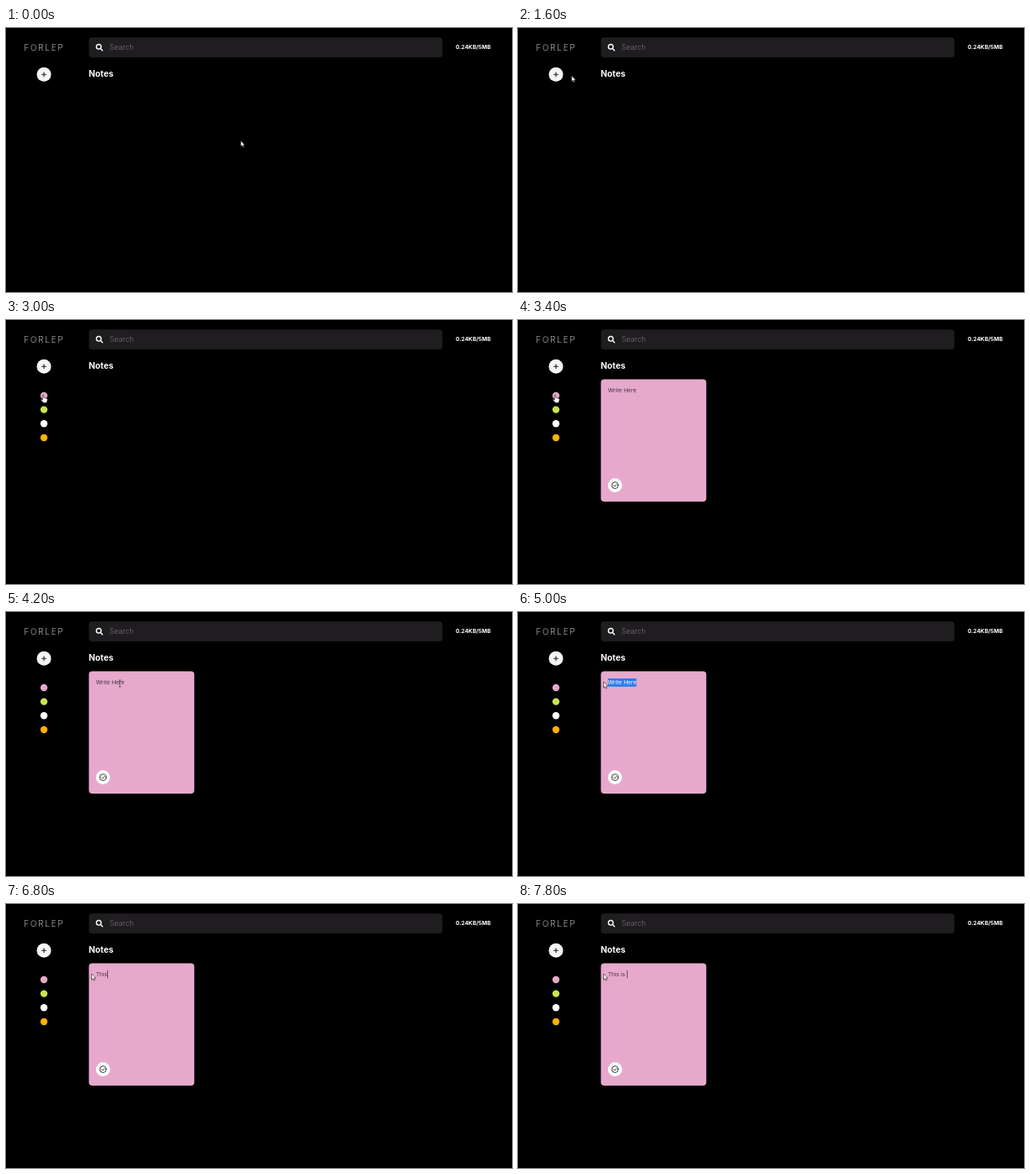
Animation of 600x314 px, one loop 8 s. Source, as an HTML page:

```html
<!DOCTYPE html>
<html lang="en">
<head>
<meta charset="utf-8">
<title>Notes</title>
<style>
  html, body { margin: 0; width: 100%; height: 100%; overflow: hidden; background: #000; }
  svg { display: block; width: 100%; height: 100%; }
  text { font-family: Inter, "Open Sans", sans-serif; white-space: pre; }
  .logo { font-size: 9.8px; font-weight: 200; letter-spacing: 1.85px; fill: #fff; }
  .hint { font-size: 8.8px; font-weight: 300; fill: #747276; }
  .head { font-size: 10.2px; font-weight: 700; fill: #fff; }
  .size { font-size: 6.65px; font-weight: 700; fill: #fff; }
  .body { font-size: 6.7px; fill: #46343f; }
  .line { fill: none; stroke-linecap: round; stroke-linejoin: round; }
  .pointer path { fill: #fff; stroke: #111; stroke-width: .6; stroke-linejoin: round; }
</style>
</head>
<body>
<svg viewBox="0 0 600 314">
  <rect width="600" height="314"/>
  <text class="logo" x="21.5" y="26.8">FORLEP</text>
  <rect x="98.3" y="11.3" width="419.2" height="23.6" rx="4" fill="#1f1d1f"/>
  <g class="line" stroke="#fff" stroke-width="1.4">
    <circle cx="110" cy="22.3" r="2.8"/>
    <path d="M112.2 24.5l2.2 2.2"/>
  </g>
  <text class="hint" x="122.8" y="26.4">Search</text>
  <text class="size" x="533.3" y="25.4">0.24KB/5MB</text>
  <text class="head" x="98" y="58.2">Notes</text>
  <circle cx="45" cy="55.3" r="8.5" fill="#f4f4f4"/>
  <path class="line" stroke="#222" stroke-width="1.1" d="M42.5 55.2h5M45 52.7v5"/>

  <g id="dots">
    <circle cx="45" cy="90" r="4.2" fill="#e6a8cb"/>
    <circle cx="45" cy="106.6" r="4.2" fill="#cbe350"/>
    <circle cx="45" cy="123.3" r="4.2" fill="#fff"/>
    <circle cx="45" cy="140" r="4.2" fill="#fcb00a"/>
  </g>

  <g id="card">
    <rect x="98.3" y="70.5" width="125" height="145.5" rx="4" fill="#e6a9cc"/>
    <rect id="mark" y="79" height="9.8" fill="#2b7de9"/>
    <text class="body" id="note" x="106.7" y="86.2"><tspan id="plain"></tspan><tspan id="picked" fill="#fff"></tspan></text>
    <rect id="caret" y="78.8" width=".7" height="9.6" fill="#33262e"/>
    <circle cx="115" cy="196.6" r="8.4" fill="#fff"/>
    <g class="line" stroke="#222" stroke-width=".9">
      <circle cx="115" cy="196.6" r="3.8"/>
      <path d="M113.3 196.7l1.3 1.3 2.4-2.6"/>
    </g>
  </g>

  <g class="pointer" id="pointer">
    <path id="arrow" d="M0 0V7L1.6 5.6 2.7 8.1 3.9 7.6 2.8 5.2H5Z"/>
    <path id="hand" d="M2 .8Q2.8 0 3.5.8V3.9L6.8 4.6Q8 4.9 7.9 6L7.4 8.4 6.8 10H3.2L.5 6.9Q-.1 6 .7 5.6L2 6.4Z"/>
    <path id="beam" d="M-1.4-4H1.4M0-4V4M-1.4 4H1.4" style="stroke:#222"/>
  </g>
</svg>
<script>
const LOOP = 8000, TICK = 200, LEFT = 106.7;
const $ = id => document.getElementById(id);
const show = (el, on) => el.setAttribute("visibility", on ? "inherit" : "hidden");
const last = (list, t) => list.filter(e => e[0] <= t).pop();

// time, x, y, shape
const moves = [
  [0, 278.3, 134, "arrow"], [1200, 235, 117, "arrow"], [1400, 118, 74, "arrow"],
  [1600, 63.5, 56.7, "arrow"], [1800, 49, 56, "hand"], [2000, 42, 55.5, "hand"],
  [2400, 42, 58, "hand"], [2600, 43, 70, "arrow"], [2800, 42, 84, "hand"],
  [3000, 41.3, 88.6, "hand"], [3600, 50, 89, "arrow"], [3800, 78, 89, "arrow"],
  [4000, 115, 87, "beam"], [4200, 135, 85, "beam"], [4400, 141.5, 84, "beam"],
  [4600, 134, 84, "beam"], [4800, 117, 84, "beam"], [5000, 101.5, 83, "arrow"]
];
// time, first selected letter
const picks = [[0, 10], [4600, 8], [4800, 3], [5000, 0]];
// time, letters typed
const keys = [[0, 0], [6200, 1], [6400, 2], [6600, 3], [6800, 4], [7200, 5], [7400, 6], [7600, 7], [7800, 8]];

const dots = [...$("dots").children];

function drawDots(t) {
  dots.forEach((dot, i) => {
    const p = Math.min(1, Math.max(0, (t - 2250 - i * 60) / 350));
    const rest = (1 - p) ** 3;
    dot.setAttribute("opacity", 1 - rest);
    dot.setAttribute("transform", `translate(0 ${-12 * rest})`);
  });
}

function drawNote(t) {
  show($("card"), t >= 3400);
  const typed = last(keys, t)[1];
  const text = typed ? "This is ".slice(0, typed) : "Write Here";
  const from = typed ? text.length : last(picks, t)[1];
  $("plain").textContent = text.slice(0, from);
  $("picked").textContent = text.slice(from);
  const start = $("plain").getComputedTextLength();
  $("mark").setAttribute("x", LEFT + start);
  $("mark").setAttribute("width", $("picked").getComputedTextLength());
  $("caret").setAttribute("x", LEFT + start);
  show($("caret"), typed > 0);
}

function drawPointer(t) {
  const [, x, y, shape] = last(moves, t);
  $("pointer").setAttribute("transform", `translate(${x} ${y})`);
  for (const id of ["arrow", "hand", "beam"]) show($(id), id === shape);
}

function draw(now) {
  const t = Math.floor(now % LOOP / TICK) * TICK;
  drawDots(t);
  drawNote(t);
  drawPointer(t);
}

let origin;
function loop(now) {
  origin ??= now;
  draw(now - origin);
  requestAnimationFrame(loop);
}
draw(0);
requestAnimationFrame(loop);
</script>
</body>
</html>
```
